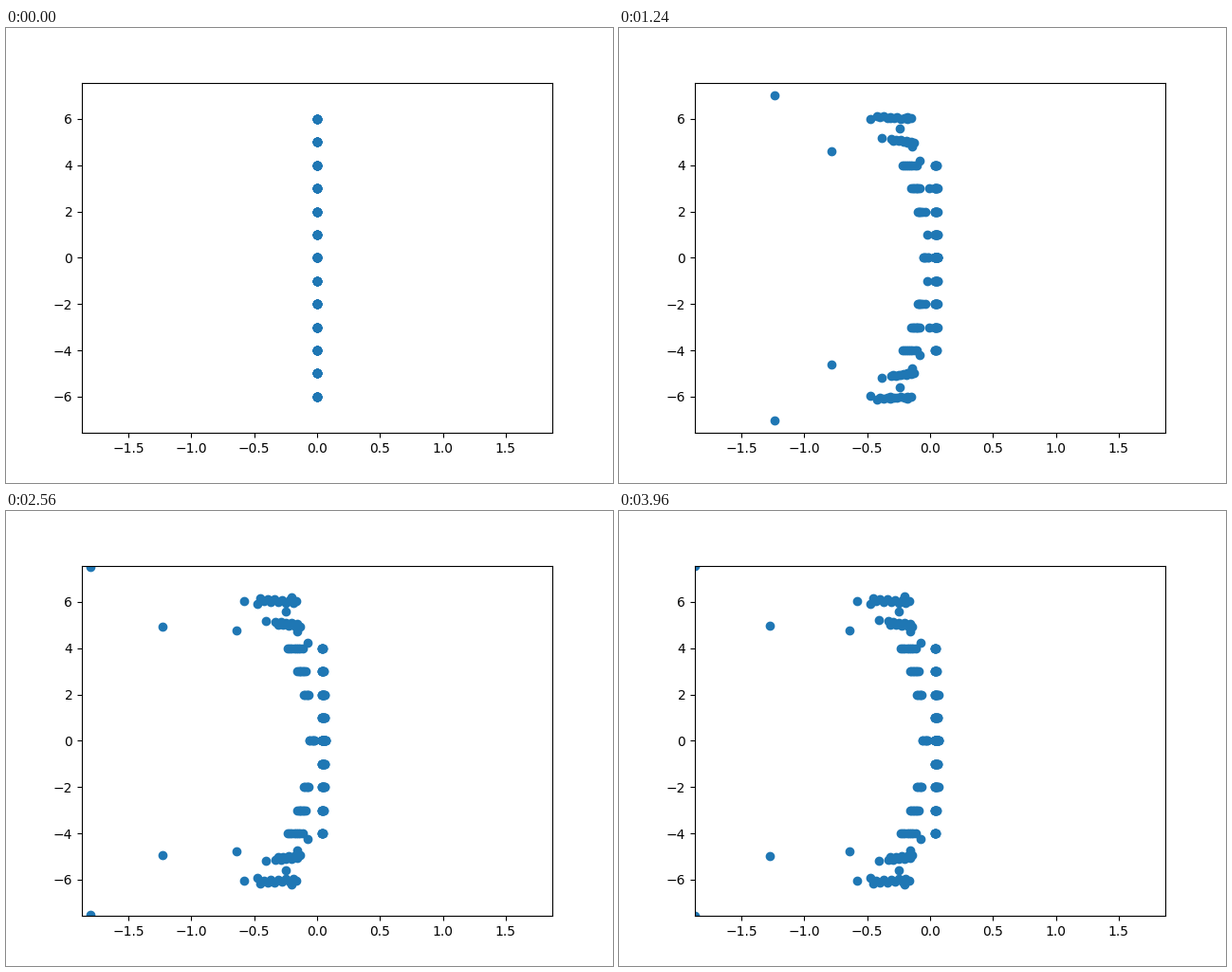
A matplotlib script that plays this animation: 640x480 px, repeating every 4.05 s.

```python
import numpy as np
import matplotlib.pyplot as plt
from matplotlib.animation import FuncAnimation

STEPS = 100           # distinct pictures, 40 ms each; the last one holds longer
TICK, TICKS = 10, 405
XMAX, YMAX = 1.871, 7.572
t = np.arange(STEPS)


def rise(scale, power):
    """Ease from 0 to 1; a higher power starts later and more abruptly."""
    return 1 - np.exp(-(t / scale) ** power)


quick = 1 - (1 - np.minimum(t / 20, 1)) ** 2
settle = rise(42, 2.5)
kick = quick + 1.5 * (t / 7 * np.exp(1 - t / 7)) ** 3
xs, ys = [], []


def add(x, y):
    """Store a path and its mirror image below the axis."""
    xs.extend((x, x))
    ys.extend((y, -y))


def move(row, near, far, scale, power):
    """Leave the row quickly for near, then ease on to far."""
    late = rise(scale, power)
    add(quick * near[0] + late * (far[0] - near[0]),
        row + quick * (near[1] - row) + late * (far[1] - near[1]))


def left_band(row):
    """Points strung out to the left, further and less evenly in outer rows."""
    start, end = -0.06 - 0.011 * row ** 2, -0.02 - 0.024 * row
    n = 3 + int(1.4 * row)
    for i, u in enumerate(np.linspace(0, 1, n)):
        x = (start + (end - start) * u) * quick * (0.89 + 0.11 * settle)
        wave = 0.06 * settle * (-1) ** i + 0.1 * (1 - u)
        add(x, row + wave * quick * (row > 4))


def right_band(row):
    """A tight group that overshoots to the right before it settles."""
    for u in np.linspace(0, 1, 11 - row):
        first = 0.034 + 0.025 * u
        last = 0.034 + (0.036 - 0.006 * row) * u
        add(kick * (first + (last - first) * settle), row + 0 * t)


for row in (0, 2, 3, 4, 5, 6):
    left_band(row)
for row in range(5):
    right_band(row)

# Strays that leave their rows
move(6, (0, 6), (-XMAX, YMAX), 29.5, 1.56)
move(4, (0, 4), (-1.276, 4.97), 32, 1.7)
move(5, (-0.09, 4.8), (-0.642, 4.77), 45.5, 6)
move(6, (-0.15, 5.85), (-0.582, 6.03), 25, 1.6)
move(6, (-0.287, 6.04), (-0.476, 5.91), 44, 5)
move(6, (-0.234, 5.6), (-0.25, 5.6), 40, 3)
move(6, (-0.166, 6.02), (-0.204, 6.23), 42, 3)
move(5, (-0.37, 5.18), (-0.408, 5.2), 42, 3)
move(5, (-0.19, 5.02), (-0.16, 4.73), 46, 4)
move(4, (-0.098, 4.15), (-0.075, 4.24), 30, 2)

# Points that cross the gap inside a row
move(3, (-0.06, 3), (0.04, 3), 34, 3)
move(2, (-0.042, 2), (0.068, 2), 53, 6)
move(1, (-0.045, 1), (0.035, 1), 40, 5)

xs, ys = np.array(xs), np.array(ys)

fig, ax = plt.subplots(figsize=(6.4, 4.8), dpi=100)
ax.set_xlim(-XMAX, XMAX)
ax.set_ylim(-YMAX, YMAX)
dots, = ax.plot([], [], "o", color="C0")


def draw(tick):
    step = min(tick * TICK // 40, STEPS - 1)
    dots.set_data(xs[:, step], ys[:, step])
    return dots,


anim = FuncAnimation(fig, draw, frames=TICKS, interval=TICK, repeat=True,
                     repeat_delay=0, init_func=lambda: draw(0))
plt.show()
```
